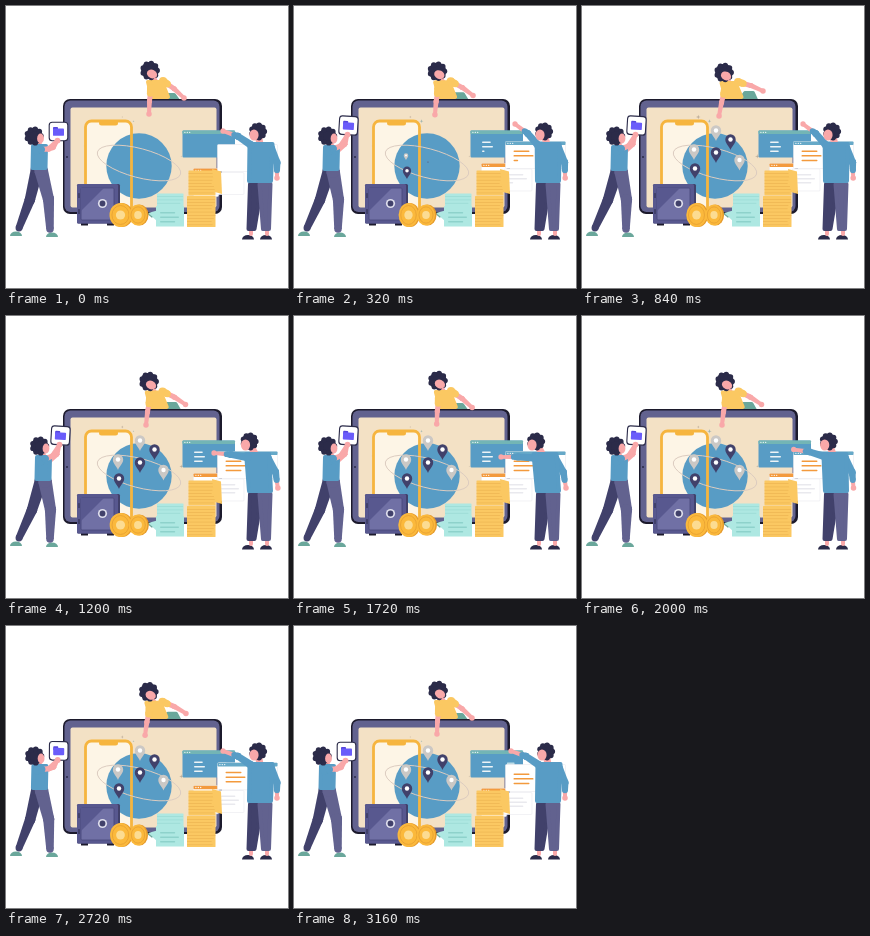
An HTML page with a canvas for the animation above (3.2 s loop, 282 by 282 pixels).

```html
<!DOCTYPE html>
<html lang="en">
<head>
<meta charset="utf-8">
<title>Digital assets</title>
<style>
html, body { margin: 0; width: 100%; height: 100%; overflow: hidden; background: #fff; }
canvas { display: block; width: 282px; height: 282px; }
</style>
</head>
<body>
<canvas id="stage"></canvas>
<script>
const SIZE = 282, LOOP = 3200, STEP = 40, TAU = Math.PI * 2;
const canvas = document.getElementById('stage');
const ratio = window.devicePixelRatio || 1;
canvas.width = canvas.height = Math.round(SIZE * ratio);
const ctx = canvas.getContext('2d');

const C = {
  navy: '#2b2b49', ink: '#1c1a2c', purple: '#62628f', deep: '#41416b', cream: '#f3e1c5',
  blue: '#589cc5', skin: '#f9a8a9', gold: '#f6b53f', amber: '#fbc862', amberLine: '#e6ab4b',
  mint: '#aee8e2', mintLine: '#8ed2cb', sage: '#6aa79b', white: '#ffffff', grey: '#cbc8c5',
  orange: '#f39a3d', pale: '#e9e9ee'
};

const mix = (a, b, k) => a + (b - a) * k;
const clamp = x => Math.max(0, Math.min(1, x));
const ease = x => { x = clamp(x); return x * x * (3 - 2 * x); };
const ramp = (t, a, b) => ease((t - a) / (b - a));
const wave = (t, period) => 0.5 - 0.5 * Math.cos(t / period * TAU);
const point = (x, y) => ({ x, y });
const between = (a, b, k) => point(mix(a.x, b.x, k), mix(a.y, b.y, k));

// Eased values at time t between keys of the form [time, ...values]
function track(t, keys) {
  const i = Math.max(1, keys.findIndex(key => key[0] > t));
  const [a, b] = [keys[i - 1], keys[i]];
  const k = ramp(t, a[0], b[0]);
  return a.slice(1).map((v, j) => mix(v, b[j + 1], k));
}

function paint(fill, line, width = 1) {
  if (fill) { ctx.fillStyle = fill; ctx.fill(); }
  if (line) { ctx.strokeStyle = line; ctx.lineWidth = width; ctx.stroke(); }
}
function box(x, y, w, h, r, fill, line, width) {
  ctx.beginPath();
  ctx.roundRect(x, y, w, h, r);
  paint(fill, line, width);
}
function oval(x, y, rx, ry, fill, turn = 0, line, width) {
  ctx.beginPath();
  ctx.ellipse(x, y, rx, ry, turn, 0, TAU);
  paint(fill, line, width);
}
function dot(p, r, fill) { oval(p.x, p.y, r, r, fill); }
function poly(points, fill, line, width) {
  ctx.beginPath();
  ctx.lineJoin = 'round';
  for (const p of points) ctx.lineTo(p.x, p.y);
  ctx.closePath();
  paint(fill, line, width);
}

// A body part that tapers from radius ra at a to rb at b
function bone(a, b, ra, rb, fill) {
  const turn = Math.atan2(b.y - a.y, b.x - a.x) + Math.PI / 2;
  const side = (p, r) => point(p.x + r * Math.cos(turn), p.y + r * Math.sin(turn));
  poly([side(a, ra), side(b, rb), side(b, -rb), side(a, -ra)], fill);
  dot(a, ra, fill);
  dot(b, rb, fill);
}
function trunk(top, topHalf, base, baseHalf, fill) {
  poly([
    point(top.x - topHalf, top.y), point(top.x + topHalf, top.y),
    point(base.x + baseHalf, base.y), point(base.x - baseHalf, base.y)
  ], fill, fill, 4);
}
// Middle joint of two equal segments, bent to one side
function joint(a, b, bend) {
  const mid = between(a, b, 0.5), d = Math.hypot(b.x - a.x, b.y - a.y);
  return point(mid.x - (b.y - a.y) / d * bend, mid.y + (b.x - a.x) / d * bend);
}
// sleeve: share of the lower arm that is covered
function arm(a, b, bend, r, cloth, sleeve) {
  const mid = joint(a, b, bend);
  bone(a, mid, r, r, C.skin);
  bone(mid, b, r, r * 0.75, C.skin);
  dot(b, r * 1.1, C.skin);
  if (!cloth) return;
  if (sleeve > 0) bone(mid, between(mid, b, sleeve), r * 1.4, r * 1.2, cloth);
  bone(a, sleeve > 0 ? mid : between(a, mid, 0.4), r * 1.6, r * 1.4, cloth);
}
function leg(hip, ankle, bend, r, fill) {
  const knee = joint(hip, ankle, bend);
  bone(hip, knee, r, r * 0.82, fill);
  bone(knee, ankle, r * 0.82, r * 0.55, fill);
}
function shoe(x, y, fill) {
  ctx.beginPath();
  ctx.ellipse(x, y, 6, 4.5, 0, Math.PI, TAU);
  paint(fill);
}
function hair(x, y, r) {
  oval(x, y, r, r, C.navy);
  for (let a = 0; a < TAU; a += TAU / 9) {
    oval(x + (r - 1.6) * Math.cos(a), y + (r - 1.6) * Math.sin(a), 2.7, 2.7, C.navy);
  }
}

function tablet() {
  box(57, 93, 159, 115, 7, C.ink);
  box(58.5, 94.5, 155, 111.5, 6, C.purple);
  box(64.5, 101.5, 146, 100, 2, C.cream);
  oval(61, 151, 1, 1, C.navy);
}

function sparkles(t) {
  for (let i = 0; i < 7; i++) {
    const x = 70 + (i * 0.618 + 0.37) % 1 * 125, y = 108 + (i * 0.414 + 0.05) % 1 * 60;
    const r = 0.7 + 1.6 * wave(t + i * 370, 1600);
    ctx.beginPath();
    for (let a = 0; a < 8; a++) {
      const d = a % 2 ? r * 0.3 : r;
      ctx.lineTo(x + d * Math.cos(a * TAU / 8), y + d * Math.sin(a * TAU / 8));
    }
    paint(i % 2 ? '#9ab2ae' : '#b8a896');
  }
}

function planet() {
  box(79.5, 115, 46, 96, 6, '#fdf5e6');
  oval(133, 160, 32.7, 32.7, C.blue);
  box(79.5, 115, 46, 96, 6, null, C.gold, 2.8);
  box(93, 114.5, 19, 5, 2.5, C.gold);
  oval(133, 157, 43, 14.5, null, 0.26, '#dcccc0', 1);
}

function pin(x, y, color, k) {
  if (k <= 0) return;
  ctx.save();
  ctx.translate(x, y);
  ctx.scale(k, k);
  ctx.beginPath();
  ctx.moveTo(0, 0);
  ctx.bezierCurveTo(-1.5, -4, -5.2, -6.5, -5.2, -10.5);
  ctx.arc(0, -10.5, 5.2, Math.PI, 0);
  ctx.bezierCurveTo(5.2, -6.5, 1.5, -4, 0, 0);
  paint(color);
  oval(0, -10.5, 2.2, 2.2, C.white);
  ctx.restore();
}
function pins(t) {
  const tips = [[113, 173], [112, 154], [134, 157], [157.5, 164.5], [148.5, 144], [134, 135]];
  tips.forEach(([x, y], i) => {
    const start = 150 + i * 60;
    pin(x, y, i % 2 ? C.grey : C.deep, ramp(t, start, start + 240));
  });
}

function rows(x, y, width, count, gap, color, k) {
  for (let i = 0; i < count; i++) {
    const w = width * (i % 2 ? 1 : 0.8) * clamp(k * count - i);
    if (w > 0) box(x, y + i * gap, w, 1.5, 0.7, color);
  }
}
function pane(x, y, w, h, bar, fill) {
  box(x, y, w, h, 1, fill, fill === C.white ? C.pale : null, 0.6);
  if (!bar) return;
  box(x, y, w, 3.6, 0.8, bar);
  for (let i = 1; i < 4; i++) oval(x + i * 2.4, y + 1.8, 0.65, 0.65, C.white);
}
function panes(t, sag) {
  const k = ramp(t, 60, 440);
  pane(176.5, 124.5, 52.5, 27, '#73b5b5', C.blue);
  rows(188, 135.5, 11, 3, 4.5, '#edf4f7', k);
  box(213, 136.5, 7.5, 3, 0.5, k > 0.5 ? '#bcdbe5' : C.blue);

  pane(187.5, 157.5 + 5 * sag, 25, 28, C.orange, C.white);
  pane(210, 163 + 3.5 * sag, 28, 22, null, C.white);
  rows(215, 168 + 3.5 * sag, 18, 3, 4, C.pale, k);
  pane(211.5, 135.5 + 3 * sag, 60, 27, sag < 0.9 ? '#66a9c8' : null, C.white);
  rows(219.5, 144.5 + 3 * sag, 20, 3, 4.6, C.orange, k);
}

function stack(x, y, w, h, color, line) {
  box(x, y, w, h, 0.6, color);
  for (let i = 3; i < h; i += 3.2) {
    box(x, y + i, w - 2 + 2 * Math.sin(i * 2.4), 0.5, 0, line);
  }
}
function papers() {
  stack(182.5, 164.5, 27, 25, C.amber, C.amberLine);
  poly([point(206, 163), point(215, 165.5), point(216, 188), point(209, 186)], C.amber);
  stack(181, 190, 28.5, 31, C.amber, C.amberLine);
  stack(151, 187.5, 26.5, 13, C.mint, C.mintLine);
  box(150, 200, 28, 20.5, 0.5, C.mint);
  rows(154, 206, 19, 3, 4.5, C.mintLine, 1);
  poly([point(142, 207), point(153, 204), point(151, 215)], C.mint);
  bone(point(141, 207), point(146, 211), 0.6, 0.6, C.sage);
}

function safe() {
  for (const x of [75, 101]) box(x, 215, 7, 4.5, 0.6, C.ink);
  box(71, 178, 43, 39.5, 1.5, C.deep);
  box(71, 178, 41, 39.5, 1.5, '#58588f');
  box(75, 182, 33, 32, 1, '#7070a5', '#48487a', 0.8);
  poly([point(75, 182), point(98, 182), point(75, 205)], '#58588f');
  oval(96.5, 197.5, 4.6, 4.6, '#dedeec');
  oval(96.5, 197.5, 2.9, 2.9, C.deep);
  for (const y of [187, 203]) box(72, y, 2, 5, 0.5, C.deep);
}

function coin(x, y, r, t) {
  const rx = r * (1 - 0.1 * wave(t, 640));
  oval(x + 1, y, rx, r * 1.1, '#e59a2c');
  oval(x - 0.5, y, rx, r * 1.1, '#fbb93c');
  oval(x - 0.5, y, rx * 0.78, r * 0.86, null, 0, '#e8a233', 0.9);
  oval(x - 0.5, y, rx * 0.42, r * 0.42, '#fcdc92');
}

// k: 0 upright, 1 leaning out
function topWoman(k) {
  const head = point(144 - 2 * k, 64.5 + 2 * k);
  const top = point(149 - 2.5 * k, 76 + k), base = point(154 - 2.5 * k, 91);
  arm(point(157 - k, 75 + k), point(178 + 3 * k, 92 - 7 * k), -1, 2.5, C.amber, 0);
  bone(head, top, 3, 3, C.skin);
  trunk(top, 7, base, 8, C.amber);
  arm(point(145 - 2 * k, 82 + k), point(143 - 6 * k, 108 + 2 * k), 0.5, 2.5, C.amber, 0);
  hair(head.x, head.y, 8.8);
  oval(head.x + 2, head.y + 3.5, 5.3, 4.3, C.skin, 0.45);
}
function skirt(k) {
  trunk(point(164 + 3 * k, 89 - 2 * k), 4, point(164 + 2 * k, 96), 9, C.sage);
}

function folder(x, y, turn) {
  ctx.save();
  ctx.translate(x, y);
  ctx.rotate(turn);
  box(-9.3, -9.3, 18.6, 18.6, 3, C.white, C.navy, 1.1);
  box(-5.5, -4.5, 5, 4, 0.8, '#5546dc');
  box(-5.5, -3, 11, 7.3, 0.9, '#6a5cfa');
  ctx.restore();
}

// k: 0 card held forward, 1 card raised
function leftWoman(k) {
  const head = point(28 + 5.5 * k, 130), hip = point(33 + 4 * k, 162 + k);
  const top = point(33.5 + 4 * k, 140 + k), card = point(52.5 + 2 * k, 125.5 - 6 * k);
  const grip = point(card.x - 1, card.y + 9);
  shoe(10, 230, C.sage);
  shoe(46, 231, C.sage);
  leg(point(hip.x - 2, hip.y + 2), point(13, 222), -2, 6.3, C.deep);
  leg(point(hip.x + 2, hip.y + 2), point(44, 223), -3, 6.8, C.purple);
  bone(head, point(top.x, top.y), 3, 3, C.skin);
  arm(point(top.x + 6, top.y + 4), grip, 3, 2.4);
  trunk(top, 6.5, hip, 6.5, C.blue);
  folder(card.x, card.y, 0.06 * k);
  arm(point(top.x - 3, top.y + 4), grip, 4, 2.6, C.blue, 0);
  hair(head.x, head.y, 8.6);
  oval(head.x + 6.5, head.y + 2.5, 3.4, 5, C.skin);
}

function man(t) {
  const [x, y, lean] = track(t, [
    [0, 217, 125, 0], [300, 221, 118, 0.2], [900, 221, 118, 0.2],
    [1190, 208, 137, 0.85], [1760, 207, 141, 1], [2260, 217, 125, 0], [LOOP, 217, 125, 0]
  ]);
  const head = point(251.5 - 10 * lean, 125.5), top = point(255 - 4 * lean, 138);
  const far = point(270 + lean, 164);
  for (const footX of [242, 260]) shoe(footX, 233.5, C.navy);
  for (const ankleX of [245, 261]) bone(point(ankleX, 222), point(ankleX, 228), 2, 2, C.skin);
  trunk(point(250, 178), 6, point(245.5, 223), 3, C.deep);
  trunk(point(259, 178), 5.5, point(260, 223), 3, C.purple);
  bone(head, point(mix(head.x, top.x, 0.7), top.y), 3.5, 3.5, C.skin);
  arm(point(top.x + 10, 142), point(far.x + 1, 172), -3, 2.5, C.blue, 0.5);
  trunk(top, 11.5, point(254, 175), 11, C.blue);
  arm(point(top.x - 10, 139 + 3 * lean), point(x, y), 2 - 1.5 * lean, 2.4, C.blue, 0.25);
  hair(head.x + 0.5, head.y, 8);
  oval(head.x - 3.5, head.y + 3.5, 4.6, 5.5, C.skin);
}

function draw(t) {
  ctx.setTransform(ratio, 0, 0, ratio, 0, 0);
  ctx.fillStyle = C.white;
  ctx.fillRect(0, 0, SIZE, SIZE);
  const reach = wave(t, 1600);
  const raise = ramp(t, 0, 320) * (1 - ramp(t, 2240, 2840));
  const sag = 1 - ramp(t, 0, 320) * (1 - ramp(t, 2400, 3100));

  skirt(reach);
  tablet();
  sparkles(t);
  planet();
  pins(t);
  panes(t, sag);
  papers();
  safe();
  coin(115, 209, 11, t);
  coin(132.5, 209, 9.5, t + 160);
  topWoman(reach);
  leftWoman(raise);
  man(t);
}

const begin = performance.now();
function tick() {
  const t = (performance.now() - begin) % LOOP;
  draw(Math.floor(t / STEP) * STEP);
  requestAnimationFrame(tick);
}
tick();
</script>
</body>
</html>
```
